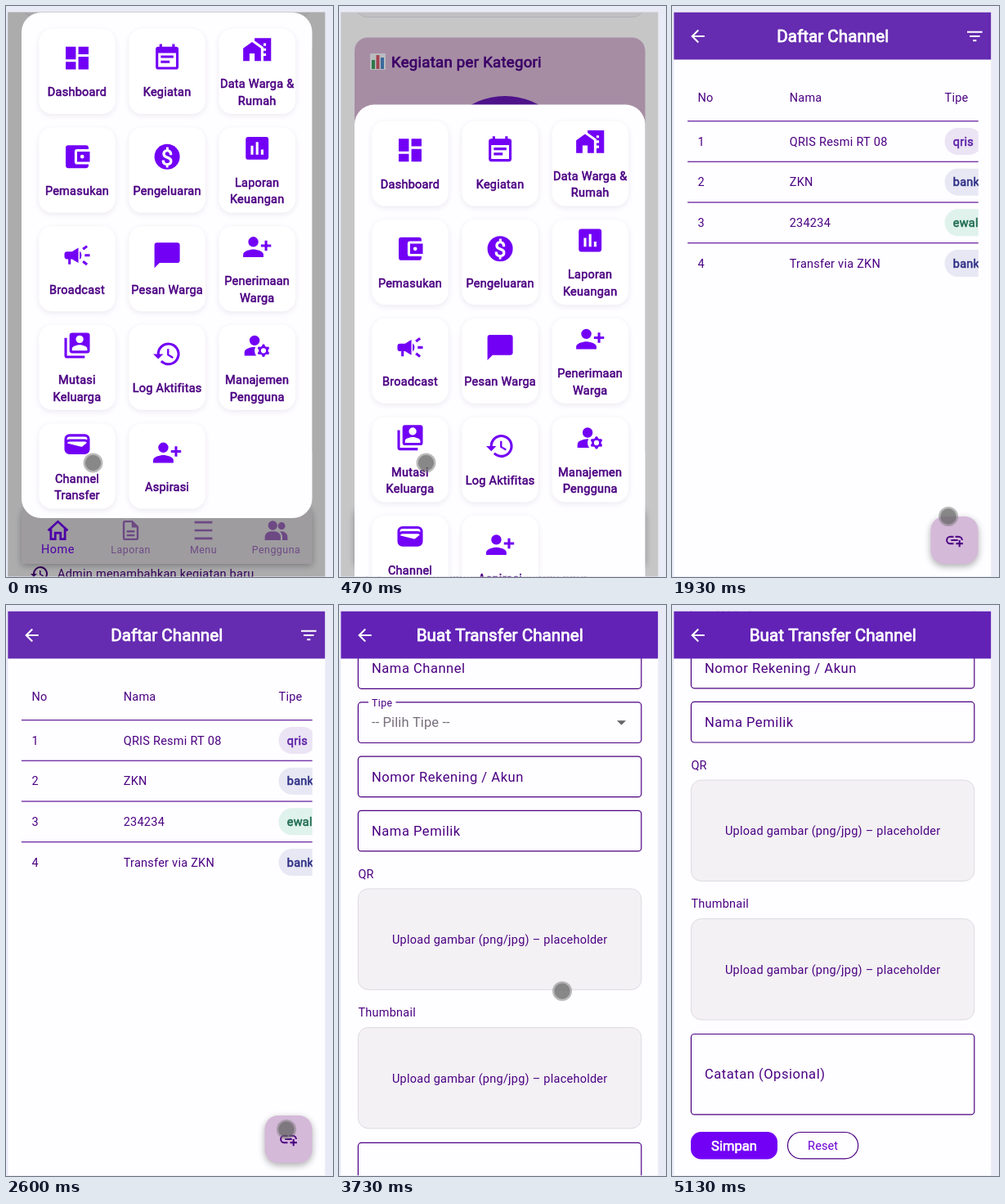
These frames come from a looping animation (400 px wide and 698 px high, 5.2 s). An HTML page with a canvas:

```html
<!DOCTYPE html>
<html lang="id">
<head>
<meta charset="utf-8">
<title>Daftar Channel</title>
<style>
html, body { margin: 0; width: 100%; height: 100%; overflow: hidden; background: #e8eaf6; }
canvas { display: block; width: 400px; height: 698px; }
</style>
</head>
<body>
<canvas id="stage"></canvas>
<script>
const W = 400, H = 698, LOOP = 5200, STEP = 1000 / 15;
const canvas = document.getElementById('stage');
const c = canvas.getContext('2d');
const dpr = window.devicePixelRatio || 1;
canvas.width = W * dpr;
canvas.height = H * dpr;

const INDIGO = '#4b0082', VIVID = '#7200f5', PAPER = '#fefdff', LILAC = '#d4b9d9';
const S = 388 / 375;              // app units to pixels
const BODY = 14 * S, FIELD = 16 * S;

const ICONS = {
  dashboard: 'M3 13h8V3H3zM3 21h8v-6H3zM13 21h8V11h-8zM13 3v6h8V3z',
  event: 'M17 10H7v2h10zM19 3h-1V1h-2v2H8V1H6v2H5a2 2 0 0 0-2 2v14a2 2 0 0 0 2 2h14a2 2 0 0 0 2-2V5a2 2 0 0 0-2-2zM19 19H5V8h14zM14 14H7v2h7z',
  homes: 'M1 11v10h5v-6h4v6h5V11L8 6zM10 3v1.97l7 5V11h2v2h-2v2h2v2h-2v4h6V3zM19 9h-2V7h2z',
  wallet: 'M21 18v1a2 2 0 0 1-2 2H5a2 2 0 0 1-2-2V5a2 2 0 0 1 2-2h14a2 2 0 0 1 2 2v1h-9a2 2 0 0 0-2 2v8a2 2 0 0 0 2 2zM12 16h10V8H12zM16 13.5a1.5 1.5 0 0 1 0-3a1.5 1.5 0 0 1 0 3z',
  coin: 'M12 2a10 10 0 0 1 0 20a10 10 0 0 1 0-20z',
  chart: 'M5 3h14a2 2 0 0 1 2 2v14a2 2 0 0 1-2 2H5a2 2 0 0 1-2-2V5a2 2 0 0 1 2-2zM9 17v-7H7v7zM13 17V7h-2v10zM17 17v-4h-2v4z',
  horn: 'M18 11v2h4v-2zM16 17.6l3.2 2.4l1.2-1.6l-3.2-2.4zM20.4 5.6L19.2 4L16 6.4L17.2 8zM4 9a2 2 0 0 0-2 2v2a2 2 0 0 0 2 2h1v4h2v-4h1l5 3V6L8 9zM15.5 12a4.5 4.5 0 0 0-1.5-3.35v6.7a4.5 4.5 0 0 0 1.5-3.35z',
  chat: 'M20 2H4a2 2 0 0 0-2 2v18l4-4h14a2 2 0 0 0 2-2V4a2 2 0 0 0-2-2z',
  addUser: 'M9 4a4 4 0 0 1 0 8a4 4 0 0 1 0-8zM15 10v2h3v3h2v-3h3v-2h-3V7h-2v3zM1 18v2h16v-2c0-2.66-5.33-4-8-4s-8 1.34-8 4z',
  cards: 'M4 6H2v14a2 2 0 0 0 2 2h14v-2H4zM20 2H8a2 2 0 0 0-2 2v12a2 2 0 0 0 2 2h12a2 2 0 0 0 2-2V4a2 2 0 0 0-2-2zM14 4a3 3 0 0 1 0 6a3 3 0 0 1 0-6zM20 16H8v-1.5c0-2 4-3 6-3s6 1 6 3z',
  history: 'M13 3a9 9 0 0 0-9 9H1l4 4l4-4H6a7 7 0 1 1 2.06 4.94l-1.42 1.42A9 9 0 1 0 13 3zM12 8v5l4.28 2.54l.72-1.21l-3.5-2.08V8z',
  manage: 'M10 4a4 4 0 0 1 0 8a4 4 0 0 1 0-8zM10.7 13c-2.7-.1-5.2.6-7.3 1.8A3 3 0 0 0 2 17.3V20h9.3a7 7 0 0 1-.6-7z',
  purse: 'M18 4H6a4 4 0 0 0-4 4v8a4 4 0 0 0 4 4h12a4 4 0 0 0 4-4V8a4 4 0 0 0-4-4zM16.1 13.8a1 1 0 0 1-.9.2L4.15 11.25A2 2 0 0 1 6 10h12a2 2 0 0 1 1.6.84zM6 6h12a2 2 0 0 1 2 2v.55A4 4 0 0 0 18 8H6a4 4 0 0 0-2 .55V8a2 2 0 0 1 2-2z',
  home: 'M12 2L1.7 11.4l1.5 1.6l.8-.7v9.2h6.5v-6h3v6H20v-9.2l.8.7l1.5-1.6zM12 4.8l5.8 5.3v9.2h-2.1v-6H8.3v6H6.2v-9.2z',
  doc: 'M8 16h8v2H8zM8 12h8v2H8zM14 2H6a2 2 0 0 0-2 2v16a2 2 0 0 0 2 2h12a2 2 0 0 0 2-2V8zM18 20H6V4h7v5h5z',
  menu: 'M3 2.7h18v2.2H3zM3 10.9h18v2.2H3zM3 19.1h18v2.2H3z',
  people: 'M8.5 2.3a4.7 4.7 0 0 1 0 9.4a4.7 4.7 0 0 1 0-9.4zM17.5 3.8a3.7 3.7 0 0 1 0 7.4a3.7 3.7 0 0 1 0-7.4zM.5 22v-3a6 6 0 0 1 6-6h4a6 6 0 0 1 6 6v3zM18.3 22v-3c0-2.5-1-4.5-2.5-6h1.7a6 6 0 0 1 6 6v3z',
  back: 'M20 11H7.83l5.59-5.59L12 4l-8 8l8 8l1.41-1.41L7.83 13H20z',
  filter: 'M10 18h4v-2h-4zM3 6v2h18V6zM6 13h12v-2H6z',
  addLink: 'M8 11h8v2H8zM20.1 12H22a5 5 0 0 0-5-5h-4v1.9h4a3.1 3.1 0 0 1 3.1 3.1zM3.9 12A3.1 3.1 0 0 1 7 8.9h4V7H7a5 5 0 0 0 0 10h4v-1.9H7A3.1 3.1 0 0 1 3.9 12zM19 12h-2v3h-3v2h3v3h2v-3h3v-2h-3z'
};
for (const name in ICONS) ICONS[name] = new Path2D(ICONS[name]);

// Cog wheel beside the person
const cog = new Path2D();
for (let i = 0; i < 24; i++) {
  const a = (i - .5) * Math.PI / 12 - Math.PI / 2;
  const r = i % 4 < 2 ? 5 : 3.7;
  cog.lineTo(17 + r * Math.cos(a), 16 + r * Math.sin(a));
}
cog.closePath();
cog.moveTo(19, 16);
cog.arc(17, 16, 2, 0, 7);
ICONS.manage.addPath(cog);

const MENU = [
  ['dashboard', 'Dashboard'], ['event', 'Kegiatan'], ['homes', 'Data Warga &', 'Rumah'],
  ['wallet', 'Pemasukan'], ['coin', 'Pengeluaran'], ['chart', 'Laporan', 'Keuangan'],
  ['horn', 'Broadcast'], ['chat', 'Pesan Warga'], ['addUser', 'Penerimaan', 'Warga'],
  ['cards', 'Mutasi', 'Keluarga'], ['history', 'Log Aktifitas'], ['manage', 'Manajemen', 'Pengguna'],
  ['purse', 'Channel', 'Transfer'], ['addUser', 'Aspirasi']
];
const CHIPS = {
  qris: ['#ebe4f5', '#5b21a5'],
  bank: ['#e7e8f4', '#2f2f86'],
  ewallet: ['#e0f2ec', '#1f6b50']
};
const ROWS = [
  ['QRIS Resmi RT 08', 'qris'], ['ZKN', 'bank'], ['234234', 'ewallet'], ['Transfer via ZKN', 'bank']
];

const clamp = v => Math.max(0, Math.min(1, v));
const smooth = v => v * v * (3 - 2 * v);

function track(keys, t, ease) {
  if (t <= keys[0][0]) return keys[0].slice(1);
  for (let i = 1; i < keys.length; i++) {
    const a = keys[i - 1], b = keys[i];
    if (t < b[0]) {
      const p = ease((t - a[0]) / (b[0] - a[0]));
      return a.slice(1).map((v, n) => v + (b[n + 1] - v) * p);
    }
  }
  return keys[keys.length - 1].slice(1);
}

// Cubic curve (0,0,.2,1) solved for x by bisection
function decelerate(x) {
  let lo = 0, hi = 1, s = .5;
  for (let i = 0; i < 20; i++) {
    s = (lo + hi) / 2;
    if (.6 * s * s * (1 - s) + s ** 3 < x) lo = s; else hi = s;
  }
  return 3 * s * s * (1 - s) + s ** 3;
}

function box(x, y, w, h, r, fill, stroke, line = 1.2) {
  c.beginPath();
  c.roundRect(x, y, w, h, r);
  if (fill) { c.fillStyle = fill; c.fill(); }
  if (stroke) { c.strokeStyle = stroke; c.lineWidth = line; c.stroke(); }
}

function shadow(color, blur, dy) {
  c.shadowColor = color;
  c.shadowBlur = blur * dpr;
  c.shadowOffsetY = dy * dpr;
}
const noShadow = () => shadow('transparent', 0, 0);

// y is the middle of the capitals
function text(s, x, y, size, color, { ls = .26, bold = false, align = 'left' } = {}) {
  c.font = `${size}px Roboto, sans-serif`;
  c.letterSpacing = ls + 'px';
  c.textAlign = align;
  c.fillStyle = c.strokeStyle = color;
  const base = y + size * .355;
  c.fillText(s, x, base);
  if (bold) {
    c.lineWidth = size * .039;
    c.lineJoin = 'round';
    c.strokeText(s, x, base);
  }
}

function icon(name, x, y, size, color) {
  c.save();
  c.translate(x - size / 2, y - size / 2);
  c.scale(size / 24, size / 24);
  c.fillStyle = color;
  c.fill(ICONS[name], 'evenodd');
  c.restore();
}

function dashboard() {
  c.fillStyle = PAPER;
  c.fillRect(0, 0, W, H);
  box(19, -40, 355.5, 53.5, 16, '#f8f6fa', '#e4e0e8', 1);
  box(19, 38.5, 355.5, 520, 16, '#d4b4d2');
  box(38, 58, 19, 20, 1, '#eef0f4');
  box(40, 66, 4, 11, 0, '#3c9a60');
  box(45.5, 60, 4, 17, 0, '#d0566a');
  box(51, 63, 4, 14, 0, '#4a88c8');
  text('Kegiatan per Kategori', 64, 68, 18 * S, INDIGO, { bold: true });
  c.beginPath();
  c.arc(203, 195, 85, 0, 7);
  c.fillStyle = '#6418b0';
  c.fill();
  icon('history', 41, 694, 24, INDIGO);
  text('Admin menambahkan kegiatan baru', 63, 694, BODY, INDIGO);
  shadow('rgba(0,0,0,.3)', 8, 2);
  box(19, 608, 355.5, 74, [16, 16, 0, 0], '#e8e5ea');
  noShadow();
  [['home', 'Home'], ['doc', 'Laporan'], ['menu', 'Menu'], ['people', 'Pengguna']].forEach(([ic, label], i) => {
    const x = 63.5 + 89 * i, color = i ? '#a06cc2' : VIVID;
    icon(ic, x, 641, i ? 29 : 30, color);
    text(label, x, i ? 665 : 664, i ? 12 * S : BODY, color, { ls: .5, align: 'center' });
  });
}

function sheet(dy) {
  c.save();
  c.translate(0, dy);
  box(19, 8, 355.5, 618, 24, '#fefdff');
  MENU.forEach(([ic, ...lines], i) => {
    const x = 87 + 110.1 * (i % 3), y = 120.6 * Math.floor(i / 3), two = lines.length > 1;
    shadow('rgba(60,30,90,.09)', 7, 2);
    box(x - 46.7, y + 28, 93.4, 104, 16, '#fff');
    noShadow();
    const iy = y + (two ? 53.3 : 63.6);
    icon(ic, x, iy, 36 * S, VIVID);
    if (ic === 'coin') text('$', x, iy + .3, 26, '#fff', { ls: 0, bold: true, align: 'center' });
    lines.forEach((s, n) =>
      text(s, x, y + (two ? 95 + 20.6 * n : 105.3), BODY, INDIGO, { bold: true, align: 'center' }));
  });
  c.restore();
}

function header(title, fill) {
  c.fillStyle = fill;
  c.fillRect(0, 0, W, 65.5);
  icon('back', 31.5, 37, 24 * S, '#fff');
  text(title, 196.7, 37, 20 * S, '#fff', { ls: 0, bold: true, align: 'center' });
}

function listPage() {
  c.fillStyle = PAPER;
  c.fillRect(0, 0, W, H);
  header('Daftar Channel', '#652bb0');
  icon('filter', 370.3, 37, 24 * S, '#fff');
  c.save();
  c.beginPath();
  c.rect(19, 66, 355.7, 632);
  c.clip();
  [['No', 31.5], ['Nama', 143.7], ['Tipe', 333.5]].forEach(([s, x]) => text(s, x, 111.5, BODY, INDIGO));
  ROWS.forEach(([name, type], i) => {
    const y = 165.5 + 49.66 * i, [bg, fg] = CHIPS[type];
    c.fillStyle = '#7434a8';
    c.fillRect(19, y - 25.5, 356, 1.4);
    text(i + 1, 31.5, y, BODY, INDIGO);
    text(name, 143.7, y, BODY, INDIGO);
    box(333.5, y - 16.5, type === 'qris' ? 46 : 80, 33, 16.5, bg);
    text(type, 343.8, y, BODY, fg, { bold: true });
  });
  c.restore();
  shadow('rgba(0,0,0,.32)', 8, 3);
  box(316.5, 624, 58, 58, 16.5, LILAC);
  noShadow();
  icon('addLink', 345.5, 653, 24 * S, INDIGO);
}

function formPage(scroll) {
  c.fillStyle = PAPER;
  c.fillRect(0, 0, W, H);
  c.save();
  c.translate(0, -scroll);
  ['Nama Channel', '-- Pilih Tipe --', 'Nomor Rekening / Akun', 'Nama Pemilik'].forEach((s, i) => {
    const y = 86.3 + 66.2 * i, pick = i === 1;
    box(23.4, y, 346.4, 49.6, 4, null, INDIGO);
    text(s, 40, y + 24.7, FIELD, pick ? '#77707c' : INDIGO, { ls: pick ? .1 : .52 });
    if (pick) {
      c.fillStyle = PAPER;
      c.fillRect(36, y - 2, 33.5, 4);
      text('Tipe', 40, y + .6, 12 * S, INDIGO, { ls: .4 });
      c.beginPath();
      c.moveTo(340, y + 22.3);
      c.lineTo(351, y + 22.3);
      c.lineTo(345.5, y + 27.8);
      c.fillStyle = '#666';
      c.fill();
    }
  });
  [['QR', 362], ['Thumbnail', 531.6]].forEach(([s, y]) => {
    text(s, 23.4, y, BODY, INDIGO);
    box(23.4, y + 18.5, 346.4, 123.4, 12.4, '#f3f1f4', '#dedbe2', 1);
    text('Upload gambar (png/jpg) – placeholder', 196.7, y + 80.6, BODY, INDIGO, { align: 'center' });
  });
  box(23.4, 691, 346.4, 98.4, 4, null, INDIGO);
  text('Catatan (Opsional)', 40, 740, FIELD, INDIGO, { ls: .52 });
  box(23, 810.5, 106, 33.4, 12.4, VIVID);
  text('Simpan', 76, 827.2, FIELD, '#fff', { ls: 0, bold: true, align: 'center' });
  box(141.5, 811, 86.2, 32.4, 16.2, null, INDIGO);
  text('Reset', 184.6, 827.2, BODY, '#6a00d0', { ls: .1, align: 'center' });
  c.restore();
  header('Buat Transfer Channel', scroll > 0 ? '#6222b6' : '#652bb0');
}

function clipPage() {
  c.beginPath();
  c.rect(2.2, 7.6, 388.2, 689.9);
  c.clip();
}

// Page entrance: quick fade with a slight zoom
function enter(t, start, page) {
  const p = clamp((t - start) / 270);
  if (!p) return;
  const k = .85 + .15 * (1 - (1 - p) ** 3);
  c.save();
  c.globalAlpha = clamp(p * 2.5);
  c.translate(196.5, 353);
  c.scale(k, k);
  c.translate(-196.5, -353);
  clipPage();
  page();
  c.restore();
}

const POINTER = [
  [1130, 106.5, 558.5], [1933, 338, 624], [2150, 343, 641], [3200, 343, 641],
  [3590, 275, 522], [3733, 273, 472], [3950, 268, 340], [4250, 300, -14]
];
const SCROLL = [[3600, 0], [3733, 33.5], [4000, 120], [4250, 158], [4500, 166.5]];

function pointer(t) {
  const [x, y] = track(POINTER, t, smooth);
  c.beginPath();
  c.arc(x, y, 12, 0, 7);
  c.fillStyle = 'rgba(120,120,120,.5)';
  c.fill();
  c.beginPath();
  c.arc(x, y, 9.7, 0, 7);
  c.fillStyle = 'rgba(85,85,85,.5)';
  c.fill();
}

function draw(t) {
  c.setTransform(dpr, 0, 0, dpr, 0, 0);
  c.fillStyle = '#e8eaf6';
  c.fillRect(0, 0, W, H);
  c.save();
  clipPage();
  if (t < 840) {
    dashboard();
    const p = clamp((t - 366) / 200);
    c.fillStyle = `rgba(0,0,0,${.32 * (1 - p ** 1.7)})`;
    c.fillRect(0, 0, W, H);
    if (p < 1) sheet(690 * (1 - decelerate(1 - p)));
  }
  if (t < 2990) enter(t, 560, listPage);
  enter(t, 2700, () => formPage(track(SCROLL, t, v => v)[0]));
  c.restore();
  pointer(t);
}

const origin = performance.now();
function tick() {
  const t = (performance.now() - origin) % LOOP;
  draw(Math.floor((t + 4) / STEP) * STEP % LOOP);
  requestAnimationFrame(tick);
}
tick();
</script>
</body>
</html>
```
